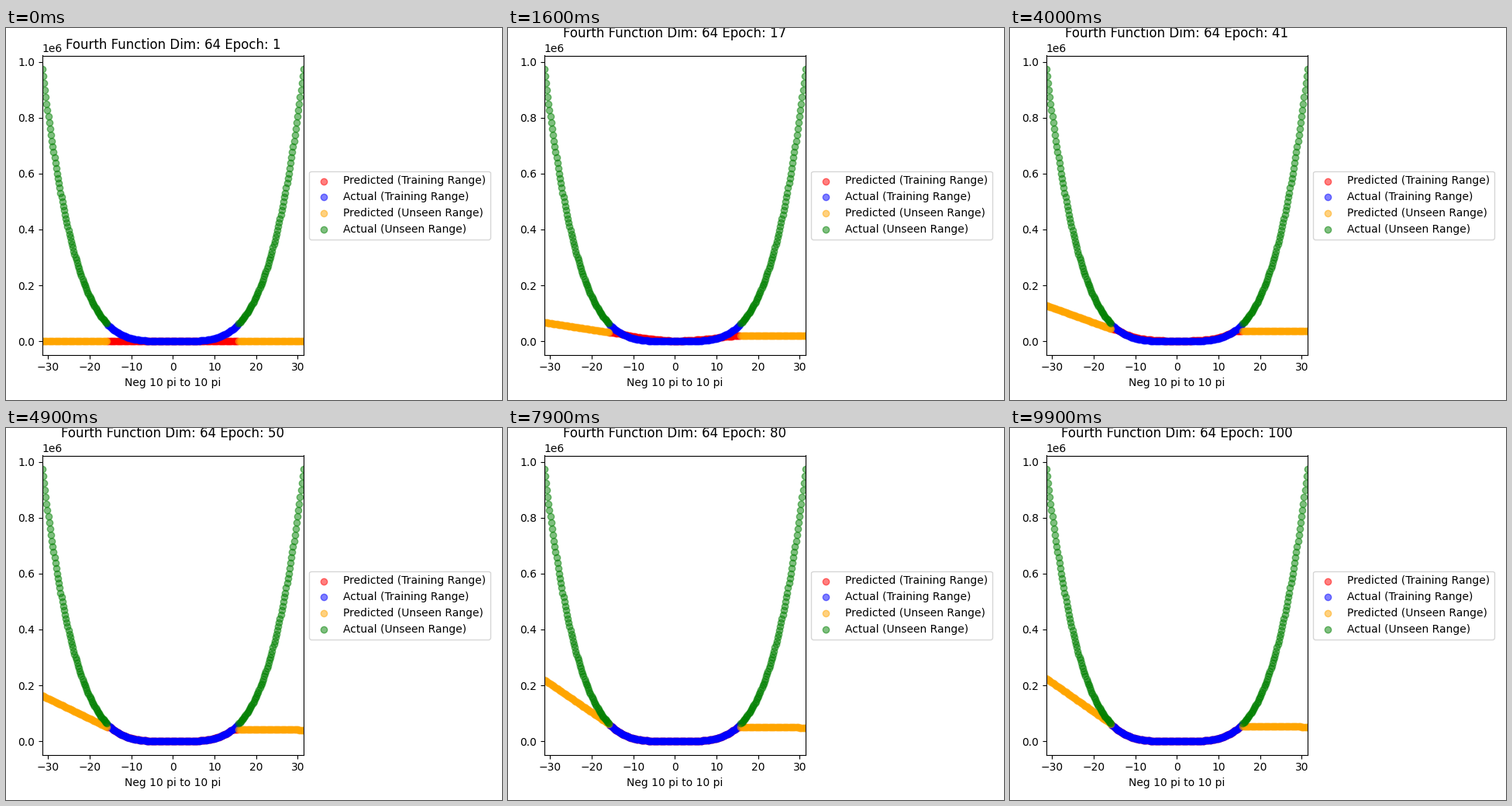
Recreate the animation shown at these times as a matplotlib script. Size 640 by 480 pixels, loop 10000 ms.

```python
import numpy as np
import matplotlib.pyplot as plt
from matplotlib.animation import FuncAnimation

plt.rcParams["font.family"] = "DejaVu Sans"

EPOCHS = 100
LIMIT = 10 * np.pi
HALF = LIMIT / 2
TITLE_PAD = 6
RAISED_PAD = 16.92  # clears the axis exponent

x = np.linspace(-LIMIT, LIMIT, 300)
inside = np.abs(x) <= HALF
seen, unseen = x[inside], x[~inside]


def rise(steps, tau):
    return 1 - np.exp(-steps / tau)


def predict(xs, epoch):
    """Fit that turns from a V into the quartic, with straight tails outside."""
    steps = epoch - 1
    early = rise(steps, 6)
    late = early / (1 + np.exp((45 - epoch) / 10.5))
    left = 32e3 * early + 29e3 * late
    far_left = 62e3 * early + 164e3 * late
    right = 57e3 * rise(steps, 37)

    dist = np.abs(xs)
    edge = np.where(xs < 0, left, right)
    learned = min(steps / 50, 1)
    core = learned * np.minimum(xs**4, edge) + (1 - learned) * edge * dist / HALF

    left_tail = left + (far_left - left) * (dist - HALF) / HALF
    right_tail = right - 1300 * late * np.maximum(dist - 28.8, 0)
    tail = np.where(xs < 0, left_tail, right_tail)
    return np.where(dist <= HALF, core, tail)


def set_title(epoch):
    pad = TITLE_PAD if epoch == 1 else RAISED_PAD
    ax.set_title(f"Fourth Function Dim: 64 Epoch: {epoch}", y=1.0, pad=pad)


def dots(xs, ys, color, label):
    return ax.scatter(xs, ys, color=color, alpha=0.5, label=label)


fig, ax = plt.subplots(figsize=(6.4, 4.8), dpi=100)
pred_seen = dots(seen, predict(seen, 1), "red", "Predicted (Training Range)")
dots(seen, seen**4, "blue", "Actual (Training Range)")
pred_unseen = dots(unseen, predict(unseen, 1), "orange", "Predicted (Unseen Range)")
dots(unseen, unseen**4, "green", "Actual (Unseen Range)")

ax.set_xlim(-LIMIT, LIMIT)
ax.set_ylim(-0.05 * LIMIT**4, 1.05 * LIMIT**4)
ax.set_xlabel("Neg 10 pi to 10 pi")
ax.legend(loc="center left", bbox_to_anchor=(1, 0.5))
set_title(1)
fig.tight_layout()
fig.subplots_adjust(top=1 - 35.5 / 480)


def update(frame):
    epoch = frame + 1
    pred_seen.set_offsets(np.column_stack([seen, predict(seen, epoch)]))
    pred_unseen.set_offsets(np.column_stack([unseen, predict(unseen, epoch)]))
    set_title(epoch)
    return pred_seen, pred_unseen


anim = FuncAnimation(fig, update, frames=EPOCHS, interval=100, repeat=True, repeat_delay=0)
plt.show()
```
